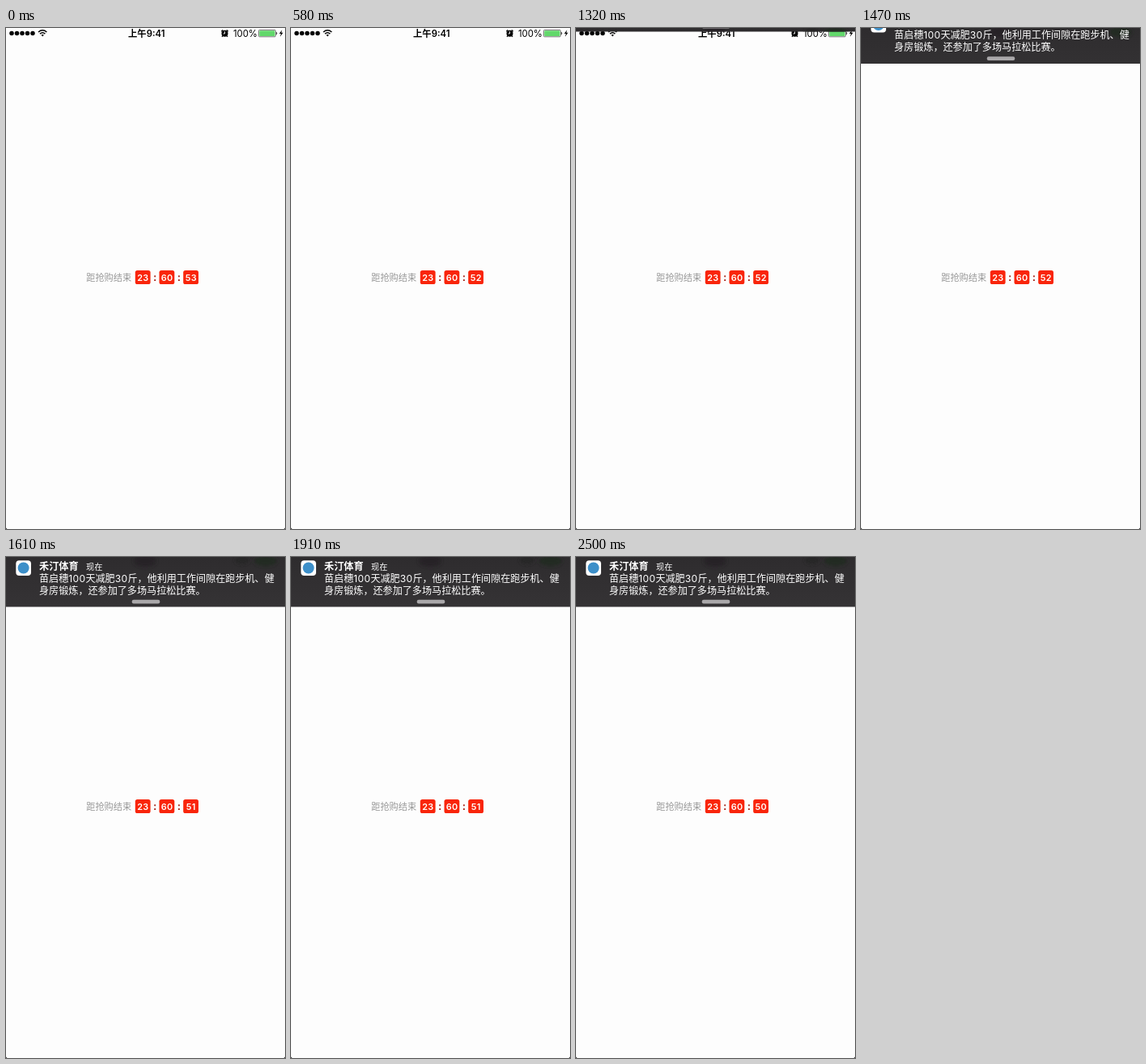
Animation of 345x618 px, one loop 2.6 s. Source, as an HTML page:

```html
<!DOCTYPE html>
<html lang="zh-CN">
<head>
<meta charset="utf-8">
<title>倒计时</title>
<style>
html, body { margin: 0; width: 100%; height: 100%; overflow: hidden; background: #fdfdfd; }
svg { display: block; width: 100%; height: 100%; }
text { font-family: Inter, "Noto Sans CJK SC", "Noto Sans CJK", sans-serif; }
.bold { font-weight: 600; }
.digits { text-anchor: middle; letter-spacing: .35px; }
.wide { letter-spacing: .3px; }
</style>
</head>
<body>
<svg viewBox="0 0 345 618">
  <defs>
    <linearGradient id="shade" x1="0" y1="0" x2="0" y2="1">
      <stop offset="0" stop-color="#2e2c2e"/>
      <stop offset="1" stop-color="#353335"/>
    </linearGradient>
    <filter id="soft" x="-50%" y="-50%" width="200%" height="200%"><feGaussianBlur stdDeviation="2"/></filter>
    <clipPath id="cut"><rect id="cutBox" width="345" height="61.5"/></clipPath>
  </defs>
  <rect width="345" height="618" fill="#fdfdfd"/>
  <path d="M0 616.5V618H1.5ZM345 616.5V618H343.5Z" fill="#333"/>

  <g id="status">
    <g id="dots"></g>
    <g fill="none" stroke="#000" stroke-width="1.5">
      <path d="M40 5Q45.2 .6 50.4 5"/>
      <path d="M42 7.1Q45.2 4.4 48.4 7.1"/>
    </g>
    <path d="M43.5 8.6Q45.2 7.3 46.9 8.6L45.2 10.6Z"/>
    <text x="151" y="10.6" class="bold" font-size="11.3">上午</text>
    <text x="173.7" y="10.6" class="bold" font-size="11.3">9:41</text>
    <circle cx="270.5" cy="6.7" r="4"/>
    <path d="M266.3 4.2L268.2 2.4M274.7 4.2L272.8 2.4M267.9 9.6L267 10.8M273.1 9.6L274 10.8" stroke="#000" stroke-width="1.2"/>
    <path d="M270.5 4.2V7H268.5" fill="none" stroke="#fff" stroke-width=".9"/>
    <text x="281" y="10.6" font-size="11.3">100%</text>
    <rect x="312.4" y="2.4" width="21" height="8.4" rx="1.2" fill="#fdfdfd" stroke="#555" stroke-width=".8"/>
    <rect x="313.3" y="3.3" width="19.2" height="6.6" rx=".5" fill="#62d86b"/>
    <path d="M334.3 5H334.8Q335.8 6.6 334.8 8.2H334.3Z"/>
    <path d="M341.3 2.2L337.9 7.1H340L338.9 10.8L342.6 5.8H340.4Z"/>
  </g>

  <text x="99.2" y="312" font-size="11.2" fill="#999">距抢购结束</text>
  <g id="timer"></g>

  <g clip-path="url(#cut)">
    <rect width="345" height="62" fill="url(#shade)"/>
    <g filter="url(#soft)">
      <ellipse cx="172" cy="5" rx="14" ry="7" fill="#262426"/>
      <ellipse cx="292" cy="4" rx="9" ry="5" fill="#282628"/>
      <ellipse cx="321" cy="5" rx="14" ry="6" fill="#222a22"/>
    </g>
    <g id="banner">
      <rect x="12.3" y="4.2" width="18.7" height="18.7" rx="4" fill="#fff"/>
      <circle cx="21.6" cy="13.5" r="7" fill="#3c8fc9"/>
      <text x="41" y="16.3" class="bold" font-size="12.2" fill="#fff">禾汀体育</text>
      <text x="99" y="16" font-size="10.2" fill="#fff">现在</text>
      <g font-size="12.1" fill="#fff">
        <text x="41" y="30.8">苗启穗<tspan class="wide">100</tspan>天减肥<tspan class="wide">30</tspan>斤，他利用工作间隙在跑步机、健</text>
        <text x="41" y="45.7">身房锻炼，还参加了多场马拉松比赛。</text>
      </g>
      <rect x="155.7" y="52.7" width="34.6" height="4.8" rx="2.2" fill="#aaa8aa"/>
    </g>
  </g>
</svg>
<script>
const LOOP = 2600;
const FULL = 61.5;
// [start ms, value], each held until the next entry
const SECONDS = [[0, 53], [580, 52], [1610, 51], [2500, 50]];
const DROP = [[0, 0], [1320, 4.5], [1470, 44], [1610, FULL]];

const $ = id => document.getElementById(id);
const held = (steps, t) => steps.reduce((v, [at, next]) => t >= at ? next : v, steps[0][1]);

function add(parent, tag, attrs, text = "") {
  const el = document.createElementNS("http://www.w3.org/2000/svg", tag);
  for (const key in attrs) el.setAttribute(key, attrs[key]);
  el.textContent = text;
  parent.append(el);
  return el;
}

for (let i = 0; i < 5; i++) add($("dots"), "circle", { cx: 7 + i * 6.5, cy: 6.5, r: 2.75 });

const labels = [23, 60, 53].map((n, i) => {
  const x = 169.2 + i * 29.7;
  add($("timer"), "rect", { x: x - 9.4, y: 299, width: 18.8, height: 17, rx: 2.6, fill: "#f9250a" });
  if (i < 2) for (const y of [306.2, 311.1])
    add($("timer"), "rect", { x: x + 14, y: y - 1, width: 2, height: 2, rx: .6, fill: "#a92a1e" });
  return add($("timer"), "text", { x: x + .2, y: 311.9, class: "digits bold", "font-size": 10.9, fill: "#fff" }, n);
});

function draw(t) {
  const drop = held(DROP, t);
  labels[2].textContent = held(SECONDS, t);
  $("cutBox").setAttribute("height", drop);
  $("banner").setAttribute("transform", `translate(0 ${drop - FULL})`);
}

const start = performance.now();
function tick() {
  draw((performance.now() - start) % LOOP);
  requestAnimationFrame(tick);
}
tick();
</script>
</body>
</html>
```
